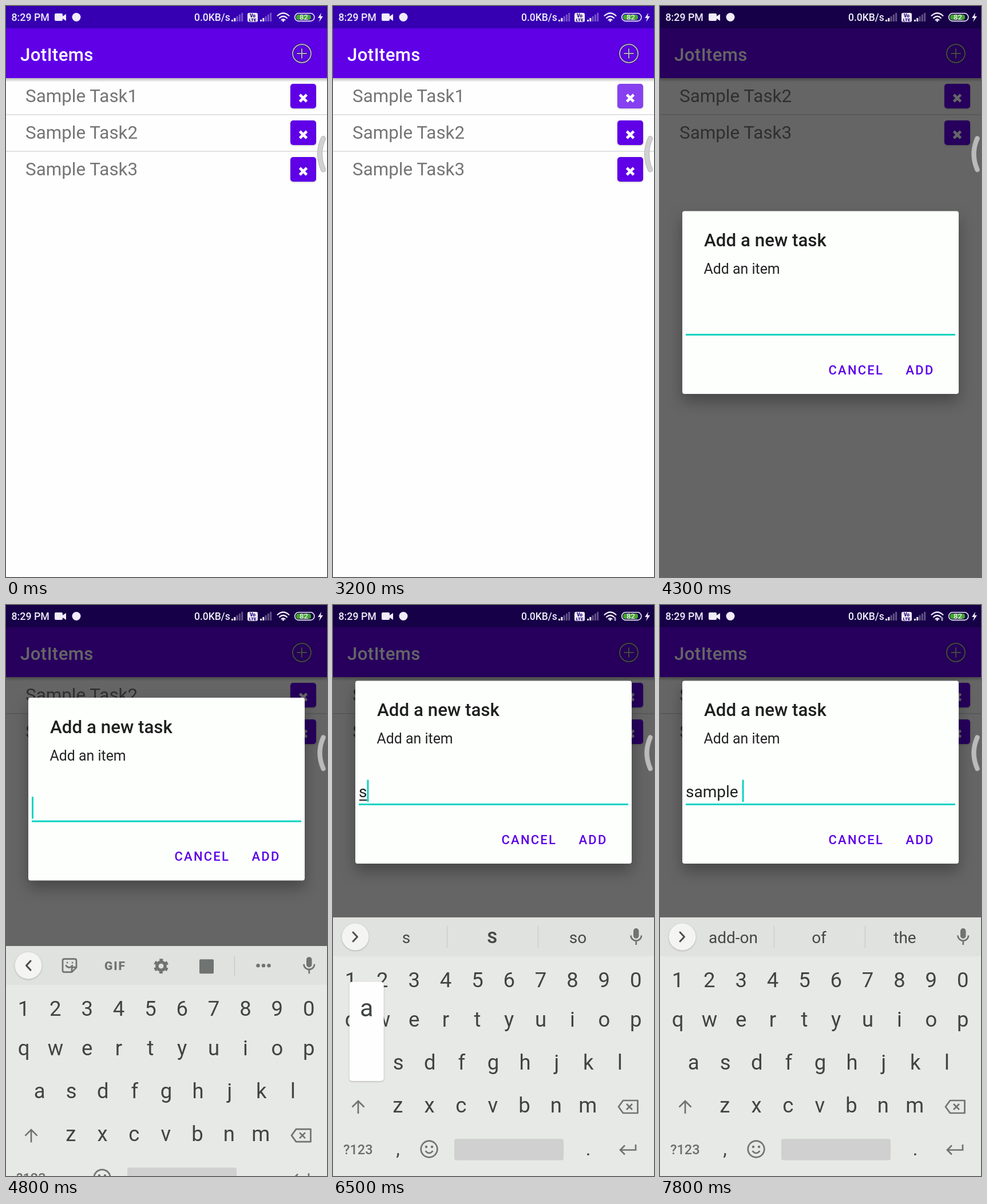
Animation of 561x998 px, one loop 8000 ms. Source, as an HTML page:

```html
<!DOCTYPE html>
<html lang="en">
<head>
<meta charset="utf-8">
<title>Task list</title>
<style>
  html, body { margin: 0; width: 100%; height: 100%; overflow: hidden; background: #fdfefd; }
  svg { display: block; width: 100%; height: 100%; font-family: Roboto, sans-serif; }
  text { white-space: pre; }
  .medium { font-weight: 500; }
  .mid { text-anchor: middle; }
  .line { fill: none; stroke-linecap: round; stroke-linejoin: round; }
  .icon { stroke: #6f7371; stroke-width: 2.7; fill: none; }
  .solid { fill: #6f7371; stroke: none; }
  .key { font-size: 36.5px; fill: #404442; text-anchor: middle; }
  .word { font-size: 28px; fill: #444846; text-anchor: middle; }
  .action { font-size: 22px; letter-spacing: 2.2px; fill: #5b00e6; font-weight: 500; }
  .lift { filter: drop-shadow(0 1px 1.5px rgba(0, 0, 0, .22)); }
  #dialog { filter: drop-shadow(0 13px 13px rgba(0, 0, 0, .3)); }
</style>
</head>
<body>
<svg viewBox="0 0 561 998" preserveAspectRatio="none">
  <defs>
    <linearGradient id="fade" x2="0" y2="1">
      <stop stop-opacity=".26"/><stop offset="1" stop-opacity="0"/>
    </linearGradient>
    <path id="plus" d="M533 83a16 16 0 1 1-32 0a16 16 0 1 1 32 0M509 83h16M517 75v16"/>
    <path id="handle" d="M554.5 231.5q-12 27 0 54.500"/>
  </defs>

  <rect width="561" height="998" fill="#fdfefd"/>
  <g id="rows"></g>
  <rect y="126" width="561" height="7" fill="url(#fade)"/>
  <rect width="561" height="126" fill="#5f00e7"/>
  <rect width="561" height="39" fill="#3600b2"/>
  <text class="medium" x="25" y="95.5" font-size="31.2" letter-spacing=".4" fill="#fff">JotItems</text>
  <circle id="addRipple" cx="517" cy="83" r="31" fill="#fff" opacity=".09"/>
  <g class="line">
    <use href="#plus" stroke="#37127c" stroke-width="4.2"/>
    <use href="#plus" stroke="#b9abcf" stroke-width="2"/>
  </g>
  <rect id="scrim" width="561" height="998"/>

  <g id="dialog">
    <rect x="39" y="132.5" width="483" height="319.5" rx="4" fill="#fdfffd"/>
    <text class="medium" x="77" y="194" font-size="31.3" fill="#1f201f">Add a new task</text>
    <text x="76.5" y="242" font-size="24.9" fill="#222322">Add an item</text>
    <text id="typed" x="45" y="336" font-size="28" fill="#1f201f"></text>
    <rect id="composing" x="46" y="340" height="2" fill="#1f201f"/>
    <rect x="45" y="347" width="471" height="3" fill="#0bd3c2"/>
    <rect id="cursor" y="305.5" width="3" height="38.5" fill="#0bd3c2"/>
    <text class="action" x="294.5" y="417.5">CANCEL</text>
    <text class="action" x="429.5" y="417.5">ADD</text>
  </g>

  <g id="keyboard">
    <rect y="546" width="561" height="452" fill="#e7e9e6"/>
    <rect y="546" width="561" height="68" fill="#e0e2df"/>
    <circle class="lift" cx="39" cy="580" r="23.5" fill="#f4f5f3"/>
    <path id="chevron" class="line" stroke="#4b4f4d" stroke-width="3"/>
    <g id="tools">
      <path class="icon line" d="M102 568.5h18q3 0 3 3v12l-8 8h-13q-3 0-3-3v-17q0-3 3-3M123 583h-5q-3 0-3 3v5M105 580q5 7 11 0M107 575h.1M116 575h.1"/>
      <text class="mid" x="191" y="587.5" font-size="21" font-weight="900" letter-spacing="2" fill="#6f7371">GIF</text>
      <circle class="icon" cx="271" cy="581" r="7.2" style="stroke-width:5.5"/>
      <circle class="icon" cx="271" cy="581" r="11" style="stroke-width:4" stroke-dasharray="5.76" transform="rotate(15 271 581)"/>
      <rect class="solid" x="338" y="569" width="25" height="25" rx="2"/>
      <path d="M399.5 563v35" stroke="#cbcdca" stroke-width="1.5"/>
      <g class="solid"><circle cx="440.5" cy="580" r="3.2"/><circle cx="450" cy="580" r="3.2"/><circle cx="459.5" cy="580" r="3.2"/></g>
    </g>
    <g id="words">
      <path d="M199.5 561v38M358.5 561v38" stroke="#cbcdca" stroke-width="1.5"/>
      <text class="word" x="128" y="591"></text>
      <text class="word" x="278" y="591"></text>
      <text class="word" x="428" y="591"></text>
    </g>
    <rect class="solid" x="525" y="565" width="9.5" height="18" rx="4.7"/>
    <path class="icon" d="M520.5 577.5a9.3 9.3 0 0 0 18.6 0M529.8 587v7"/>
    <g id="keys"></g>
    <path class="icon" d="M44 889v-22M33.5 877.5l10.5-10.5l10.5 10.5"/>
    <path class="icon" d="M507 866h25.5v22h-25.5l-8-11zM513 872l10 10M523 872l-10 10" stroke-linejoin="round"/>
    <text class="medium" x="18" y="960" font-size="23.5" fill="#6b6f6d">?123</text>
    <text class="mid" x="113.5" y="962" font-size="33" fill="#404442">,</text>
    <circle class="icon" cx="168" cy="951" r="14.3"/>
    <path class="icon" d="M161.5 954q6.500 8 13 0"/>
    <g class="solid"><circle cx="163" cy="947" r="2.2"/><circle cx="173" cy="947" r="2.2"/></g>
    <rect id="space" x="212" y="933" width="191" height="37.5" rx="4"/>
    <text class="mid" x="446" y="962" font-size="33" fill="#404442">.</text>
    <path class="icon" d="M529 943v9.5h-26M510 944.5l-8 8l8 8"/>
    <g id="popup">
      <rect class="lift" x="-30" y="-153.5" width="60" height="173.5" rx="5" fill="#fdfefd"/>
      <text class="mid" y="-93" font-size="43" fill="#404442"></text>
    </g>
  </g>

  <g fill="#f1ecfa">
    <text class="medium" x="9.5" y="26" font-size="17.8">8:29 PM</text>
    <path d="M87 13h10q2 0 2 2v3l6-4v12l-6-4v2q0 2-2 2h-10q-2 0-2-2v-9q0-2 2-2"/>
    <circle cx="123" cy="19.5" r="7.5"/>
    <text class="medium" x="329" y="26" font-size="17.5">0.0KB/s</text>
    <g id="signals"></g>
    <rect x="422" y="12" width="18" height="16" rx="3"/>
    <g class="mid" font-weight="900" fill="#2a0a80">
      <text x="431" y="19.5" font-size="8.5">Vo</text><text x="431" y="27" font-size="8">LTE</text>
    </g>
    <path class="line" stroke="#f1ecfa" stroke-width="2.2" d="M474.5 17q10-9 20 0M478 21q6.500-6 13 0M481.5 24.5q3-2.500 6 0"/>
    <circle cx="484.5" cy="26" r="1.7"/>
    <path id="traffic" d="M491 24l2-3l2 3zM491 25l2 3l2-3z"/>
    <rect x="504.8" y="12.8" width="34" height="13.6" rx="6.5" fill="none" stroke="#f1ecfa" stroke-width="1.6"/>
    <rect x="507" y="15" width="26" height="9.2" rx="4" fill="#41a62e"/>
    <text class="medium mid" x="520.5" y="24.3" font-size="13">82</text>
    <path d="M551 12l-6 9h4l-2 7l7-10h-4z"/>
  </g>

  <g class="line" opacity=".86">
    <use href="#handle" stroke="#999b99" stroke-width="9"/>
    <use href="#handle" stroke="#c9cac9" stroke-width="7.6"/>
  </g>
</svg>

<script>
const LOOP = 8000, STEP = 100;
const DELETE_PRESS = 3100, DELETED = 3300, ADD_PRESS = 3700;
const DIALOG_OPEN = 3900, SLIDE_START = 4600, KEYBOARD_TIME = 385, DIALOG_TIME = 406;

const $ = id => document.getElementById(id);
const show = (node, on) => node.setAttribute('visibility', on ? 'inherit' : 'hidden');
const shift = (node, x, y) => node.setAttribute('transform', `translate(${x} ${y})`);
const clamp = v => Math.max(0, Math.min(1, v));
// Share of a decelerating slide still to go
const remaining = (t, duration) => (1 - clamp((t - SLIDE_START) / duration)) ** 3;

// Task rows
$('rows').innerHTML = [0, 1, 2].map(i => `<g transform="translate(0 ${64 * i})">
  ${i ? '<rect y="125" width="561" height="1.7" fill="#dcdddc"/>' : ''}
  <text x="34" y="168" font-size="31.4" fill="#747574"></text>
  <rect class="lift" x="497" y="136" width="45" height="43" rx="5" fill="#5f00e7"/>
  <path d="M513.5 155l12 12M525.5 155l-12 12" stroke="#fff" stroke-width="4.6"/></g>`).join('');
const rows = [...$('rows').children];

// Signal strength bars
$('signals').innerHTML = [394, 444].map(x => [0, 1, 2, 3, 4].map(i =>
  `<rect x="${x + 4.3 * i}" y="${24 - 3 * i}" width="3" height="${3 + 3 * i}" opacity="${i < 2 ? 1 : .35}"/>`
).join('')).join('');

// Keys: letters, first centre, baseline
const keyPlace = {};
$('keys').innerHTML = [['1234567890', 31, 668], ['qwertyuiop', 31, 737], ['asdfghjkl', 58.7, 812], ['zxcvbnm', 113.2, 887]]
  .map(([letters, x0, y]) => [...letters].map((letter, i) => {
    const x = x0 + 55.35 * i;
    keyPlace[letter] = [x, y];
    return `<text class="key" x="${x}" y="${y}">${letter}</text>`;
  }).join('')).join('');

// Each press: key, time down, time up, suggestions afterwards
const presses = [
  ['s', 6300, 6400, ['s', 'S', 'so']],
  ['a', 6500, 6700, ['sa', 'Sa', 'same']],
  ['m', 6800, 6900, ['sam', 'Sam', 'same']],
  ['p', 7000, 7200, ['samp', 'sample', 'samples']],
  ['l', 7200, 7400, ['sampl', 'sample', 'samples']],
  ['e', 7400, 7600, ['sample', 'Sample', 'samples']],
  [' ', 7700, 7800, ['add-on', 'of', 'the']]
];
const wordSlots = [...$('words').querySelectorAll('text')];

function drawList(t) {
  const removed = t >= DELETED ? 1 : 0;
  rows.forEach((row, i) => {
    row.querySelector('text').textContent = `Sample Task${i + 1 + removed}`;
    show(row, i + removed < 3);
  });
  const pressed = t >= DELETE_PRESS && t < DELETED;
  rows[0].querySelector('.lift').setAttribute('fill', pressed ? '#8640f0' : '#5f00e7');
  show($('addRipple'), t >= ADD_PRESS && t < 4100);
}

function drawDialog(t) {
  $('scrim').setAttribute('opacity', t < DIALOG_OPEN ? 0 : .6 * clamp((t - 3820) / 205));
  show($('dialog'), t >= DIALOG_OPEN);
  $('dialog').setAttribute('opacity', t === DIALOG_OPEN ? .97 : 1);
  shift($('dialog'), 0, 226 * remaining(t, DIALOG_TIME));
}

function drawTyping(t) {
  const done = presses.filter(p => t >= p[2]);
  const text = done.map(p => p[0]).join('');
  const typing = text.length > 0, composing = typing && !text.endsWith(' ');
  $('typed').textContent = text;
  const width = typing ? $('typed').getComputedTextLength() : 0;
  show($('composing'), composing);
  $('composing').setAttribute('width', Math.max(0, width - 1));
  $('cursor').setAttribute('x', 45 + width);
  show($('cursor'), t >= DIALOG_OPEN && (typing || (t - 3800) % 1000 < 500));

  show($('tools'), !typing);
  show($('words'), typing);
  $('chevron').setAttribute('d', typing ? 'M35 572l7.5 8l-7.5 8' : 'M43 572l-7.5 8l7.5 8');
  wordSlots.forEach((slot, i) => {
    slot.textContent = typing ? done.at(-1)[3][i] : '';
    slot.setAttribute('font-weight', i === 1 && composing ? 700 : 400);
  });

  const held = presses.find(p => t >= p[1] && t < p[2])?.[0];
  $('space').setAttribute('fill', held === ' ' ? '#bbbdbb' : '#cfd0cf');
  const place = keyPlace[held];
  show($('popup'), place);
  if (place) {
    shift($('popup'), ...place);
    $('popup').querySelector('text').textContent = held;
  }
  show($('traffic'), t >= 6300);
}

const start = performance.now();
function tick() {
  const t = Math.floor((performance.now() - start) % LOOP / STEP) * STEP;
  drawList(t);
  drawDialog(t);
  shift($('keyboard'), 0, 452 * remaining(t, KEYBOARD_TIME));
  drawTyping(t);
  requestAnimationFrame(tick);
}
tick();
</script>
</body>
</html>
```
